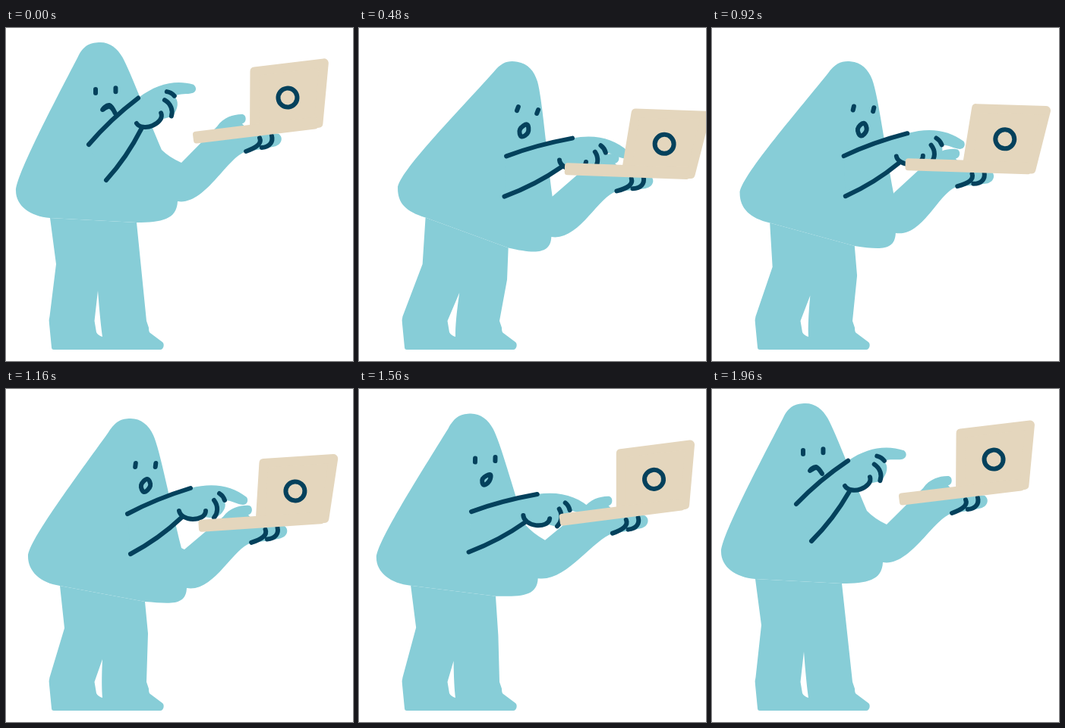
These frames come from a looping animation (457 by 440 pixels, 2 s). An HTML page:

```html
<!DOCTYPE html>
<html lang="en">
<head>
<meta charset="utf-8">
<title>Laptop in hand</title>
<style>
  html, body { margin: 0; height: 100%; overflow: hidden; background: #fff; }
  svg { display: block; width: 100vw; height: 100vh; }
  .skin { fill: #87cdd7; }
  .line { fill: none; stroke: #04415c; stroke-width: 6; stroke-linecap: round; stroke-linejoin: round; }
  .shell { fill: #e4d6bd; stroke: #e4d6bd; stroke-linejoin: round; }
</style>
</head>
<body>
<svg viewBox="0 0 457 440">
  <path id="legs" class="skin"/>
  <path id="gap" fill="#fff"/>
  <path id="body" class="skin"/>
  <path id="face" class="line"/>
  <path id="grip" class="line"/>
  <path id="arm" class="skin"/>
  <path id="armLines" class="line"/>
  <g id="laptop">
    <path class="shell" stroke-width="12" d="M6 9L16-69L108-69L91 9Z"/>
    <path class="shell" stroke-width="8" d="M-71 4H86V12H-71Z"/>
    <circle class="line" cx="55" cy="-29.5" r="12.5"/>
  </g>
</svg>
<script>
const LOOP = 2000, STEP = 40;
const times = [0, 240, 720, 1160, 1400, 1720, 1960];

// One x,y pair (or one angle in degrees) per entry of `times`.
const points = {
  top:    [122,19, 193,36, 196,47, 164,39, 155,37, 135,27, 121,19],
  side:   [13,215, 46,210, 43,216, 29,221, 27,224, 18,220, 12,215],
  seat:   [58,251, 84,248, 81,255, 71,260, 71,262, 64,256, 57,251],
  hip:    [172,257, 193,280, 192,292, 183,281, 183,279, 176,267, 171,257],
  elbow:  [226,229, 251,264, 246,275, 238,263, 239,257, 231,242, 225,229],
  armpit: [205,161, 248,209, 245,220, 231,210, 224,185, 212,174, 204,161],
  crook:  [231,178, 252,213, 247,221, 235,212, 248,207, 238,191, 230,179],
  kneeL:  [66,312, 80,310, 82,315, 77,316, 78,317, 71,313, 65,312],
  kneeR:  [178.5,322, 191,330, 194,331, 187,323, 186,323, 180.5,327, 178,322],
  crotch: [121,347, 130,349, 131,351, 127,357, 126,360, 123,356, 121,347],
  eye:    [118,83.5, 192,98.5, 197.5,109, 170.5,100.5, 163.5,98.5, 140,89, 120,83.5],
  mouthA: [127,108, 196,132, 206,146, 182,136, 176,133, 150,119, 129,108],
  mouthB: [136,102, 198,123, 202,137, 178,127, 172,125, 152,111, 137,103],
  mouthC: [144,113, 208,121, 210,130, 186,119, 180,117, 163,110, 145,112],
  mouthD: [137,104, 206,128, 213,139, 190,128, 184,125, 157,116, 138,104],
  upper:  [109,154, 178,163, 184,172, 160,165, 157,166, 135,157, 111,152],
  lower:  [132,201, 181,215, 183,225, 164,218, 153,219, 137,210, 131,201],
  hand:   [172,126, 246,159, 254,177.5, 228,161, 225,172, 203,155, 175,128],
  hinge:  [320,128, 346,169, 336,178, 328,168, 342,163, 329,146, 320,129]
};
const angles = {
  head:   [-4, 6, 6.5, 0, -2, -4, -4],
  wrist:  [-23, 0, 0, 0, 8, 0, -19.5],
  laptop: [-7, -3.8, 5.8, -3.8, -3.2, -10.8, -6.9]
};

// Cyclic cubic interpolation through unevenly spaced keys.
function sample(keys, t) {
  const n = times.length;
  const time = i => times[(i + n) % n] + LOOP * Math.floor(i / n);
  const value = i => keys[(i + n) % n];
  const slope = i => {
    const a = time(i) - time(i - 1), b = time(i + 1) - time(i);
    return ((value(i) - value(i - 1)) / a * b + (value(i + 1) - value(i)) / b * a) / (a + b);
  };
  let i = n - 1;
  while (times[i] > t) i--;
  const h = time(i + 1) - time(i), u = (t - time(i)) / h, v = 1 - u;
  return v * v * (1 + 2 * u) * value(i) + u * u * (3 - 2 * u) * value(i + 1)
    + h * u * v * (v * slope(i) - u * slope(i + 1));
}

function poseAt(t) {
  const pose = {}, turn = {};
  for (const k in points)
    pose[k] = [0, 1].map(axis => sample(points[k].filter((_, i) => i % 2 === axis), t));
  for (const k in angles) turn[k] = sample(angles[k], t);
  return { pose, turn };
}

const add = (p, x, y) => [p[0] + x, p[1] + y];
const mix = (p, q, u) => [p[0] + (q[0] - p[0]) * u, p[1] + (q[1] - p[1]) * u];

// Turns local coordinates into a list of stage coordinates.
function frame(origin, deg) {
  const c = Math.cos(deg * Math.PI / 180), s = Math.sin(deg * Math.PI / 180);
  return (...xy) => {
    const out = [];
    for (let i = 0; i < xy.length; i += 2)
      out.push(origin[0] + xy[i] * c - xy[i + 1] * s, origin[1] + xy[i] * s + xy[i + 1] * c);
    return out;
  };
}

// Closed smooth curve through points.
function loop(pts) {
  const n = pts.length, at = i => pts[(i + n) % n];
  const ctrl = (i, dir) => add(at(i), dir * (at(i + 1)[0] - at(i - 1)[0]) / 5, dir * (at(i + 1)[1] - at(i - 1)[1]) / 5);
  return `M${at(0)}` + pts.map((_, i) => `C${ctrl(i, 1)} ${ctrl(i + 1, -1)} ${at(i + 1)}`).join('') + 'Z';
}

const set = (id, d) => document.getElementById(id).setAttribute('d', d);

function draw(t) {
  const { pose: p, turn } = poseAt(t);
  const head = frame(p.top, turn.head);
  const palm = frame(p.hand, turn.wrist);
  const grip = frame(p.hinge, turn.laptop / 2);
  const lean = turn.head + 4;

  set('legs', `M${p.seat}L${p.kneeL}L57.5 381Q56 386 57 391L60 422Q60 425 63 425H203
    C208 425 209 417 206 415L190 403Q188 402 188 396L185 387L${p.kneeR}L${p.hip}Z`);
  set('gap', `M${p.crotch}L116.5 387L119 402Q121 406 127 408Q${mix(p.crotch, [125, 400], .8)} ${p.crotch}Z`);

  const temple = head(-29, 18), cheek = head(30, 22), heel = grip(-6, 35);
  set('body', `M${p.seat}
    C${add(p.seat, -26, -2 - lean / 2)} ${add(p.side, 0, 20)} ${p.side}
    C${add(p.side, 0, -20)} ${add(mix(temple, p.side, .35), -3, -1)} ${temple}
    C${mix(temple, p.side, -.09)} ${head(-12, 0)} ${p.top}
    C${head(14, 0, 24, 9)} ${cheek}
    C${head(39, 42)} ${mix(p.armpit, cheek, .4)} ${p.armpit}
    Q${mix(p.armpit, p.crook, .4)[0]} ${mix(p.armpit, p.crook, .6)[1]} ${p.crook}
    L${grip(-42, -.6)}C${grip(-33, -12, -20, -15, -9, -14.5)}
    C${grip(-2, -14.5, -2, -3, -9, -2)}
    L${grip(0, 8, 38, 14)}C${grip(44, 18, 43, 28, 32, 30.5)}
    L${grip(15, 33)} ${heel}
    C${add(heel, -25, 7)} ${add(p.elbow, 36, 6)} ${p.elbow}
    C${add(p.elbow, -1, 24)} ${add(p.hip, 33, lean * .6)} ${p.hip}Z`);

  const eyes = frame(p.eye, turn.head), slant = lean * .075;
  const eye = c => `M${add(c, slant, -2.5)}L${add(c, -slant, 2.5)}`;
  set('face', eye(p.eye) + eye(eyes(26.5, 0)) + loop([p.mouthA, p.mouthB, p.mouthC, p.mouthD]));

  set('grip', `M${grip(13, 18)}C${grip(16, 26, 7, 31, -6, 34.7)}
    M${grip(29, 16)}C${grip(30.7, 24, 26, 30.7, 15, 31)}`);

  const knuckle = palm(15, -30), base = palm(3, 9);
  const upperEdge = `Q${add(mix(p.upper, knuckle, .5), -4, -3)} ${knuckle}`;
  const lowerEdge = `Q${add(mix(p.lower, base, .5), 4, 4)} ${p.lower}`;
  set('arm', `M${p.upper}${upperEdge}
    C${palm(45, -38, 70, -33, 89, -18)}
    C${palm(92, -13, 89, -8, 84, -8)}
    C${palm(75, -9, 70, -14, 59, -14)}
    C${palm(64, -6, 58, 4, 47, 10)}
    L${palm(33, 8)}C${palm(25, 13, 9, 13)} ${base}${lowerEdge}Z`);
  set('armLines', `M${p.upper}${upperEdge}M${base}${lowerEdge}
    M${palm(0, 0)}C${palm(1, 6, 9, 11, 18, 11)}C${palm(27, 11, 35, 7, 35, 0)}
    M${palm(53, -23)}Q${palm(58, -20, 60, -14)}
    M${palm(46, -14)}C${palm(52, -6, 51, 3, 46, 9)}`);

  document.getElementById('laptop').setAttribute('transform', `translate(${p.hinge}) rotate(${turn.laptop})`);
}

function tick() {
  draw(Math.floor(performance.now() % LOOP / STEP) * STEP);
  requestAnimationFrame(tick);
}
tick();
</script>
</body>
</html>
```
